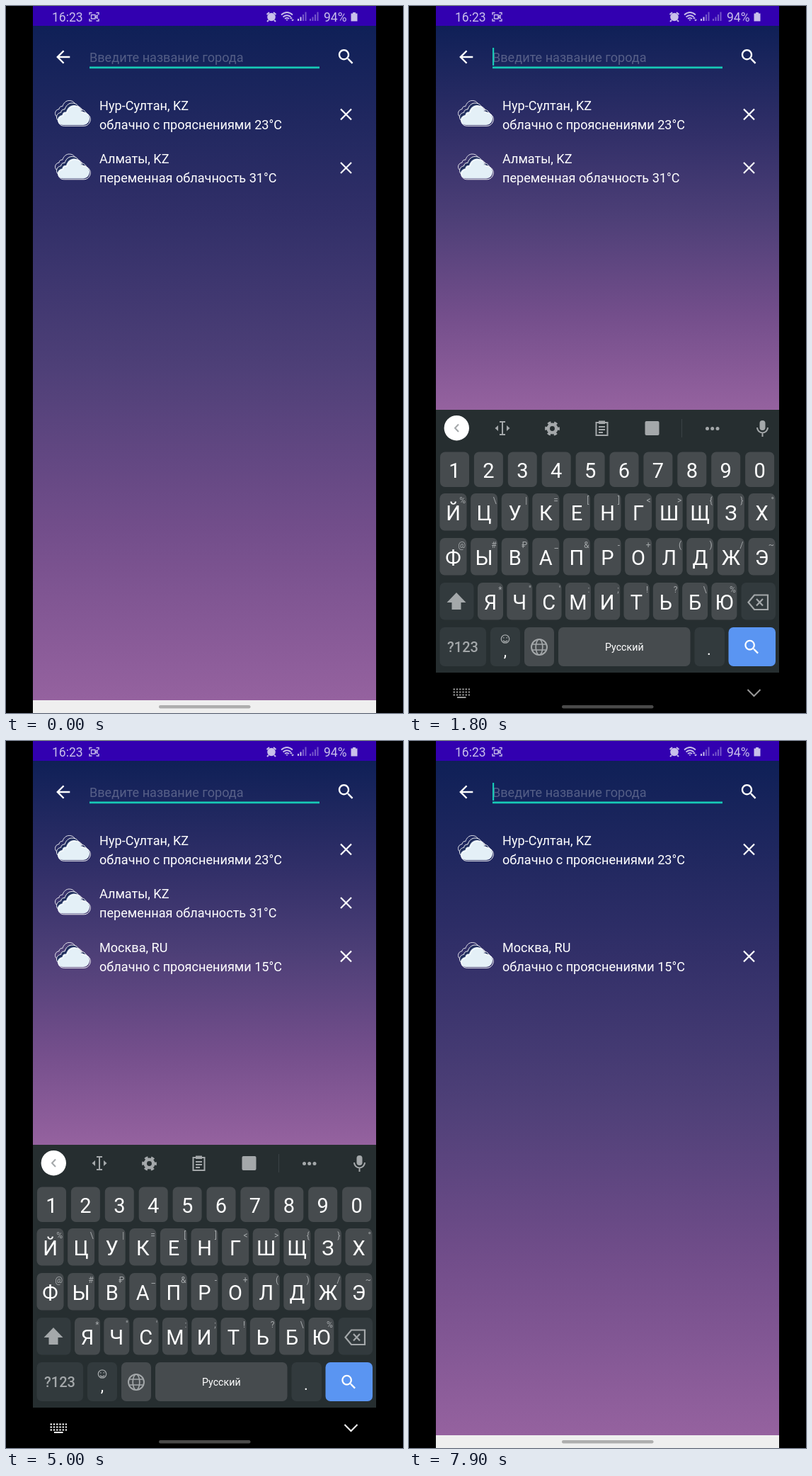
These frames come from a looping animation (561 px wide and 998 px high, 8 s). An HTML page:

```html
<!DOCTYPE html>
<html lang="ru">
<head>
<meta charset="utf-8">
<title>Города</title>
<style>
html, body { margin: 0; width: 100%; height: 100%; overflow: hidden; background: #000; }
svg { display: block; width: 561px; height: 998px; font-family: Roboto, sans-serif; }
.line { fill: none; stroke: currentColor; }
.mid { text-anchor: middle; }
.end { text-anchor: end; }
[class*="a-"] { animation: 8s linear infinite; }
.a-slide { animation-name: slide; }
.a-fade { animation-name: fade; }
.a-short { animation-name: short; animation-timing-function: step-end; }
.a-nav { animation-name: nav; }
.a-navIcons { animation-name: navIcons; }
.a-caret { animation-name: caret; animation-timing-function: step-end; }
.a-rec { animation-name: rec; animation-duration: 1s; animation-timing-function: step-end; }
.a-idle { animation-name: idle; animation-timing-function: step-end; }
.a-typing { animation-name: typing; animation-timing-function: step-end; }
.a-add { animation-name: add; }
.a-remove { animation-name: remove; }
@keyframes slide {
  0%, 9.75% { transform: translateY(113px); animation-timing-function: cubic-bezier(.33,.67,.67,1); }
  13.125% { transform: none; }
  70.125% { transform: none; animation-timing-function: cubic-bezier(.33,0,.67,.33); }
  72.31%, 100% { transform: translateY(113px); }
}
@keyframes fade {
  0%, 9% { opacity: 0; }
  11%, 70.125% { opacity: 1; }
  72.31%, 100% { opacity: 0; }
}
@keyframes short { 0%, 70% { opacity: 0; } 9.375% { opacity: 1; } }
@keyframes nav {
  0%, 12.5% { opacity: 1; }
  14%, 73.75% { opacity: 0; }
  77.5%, 100% { opacity: 1; }
}
@keyframes navIcons {
  0%, 9.7% { opacity: 0; color: #222; }
  9.8%, 12.5% { opacity: 1; color: #222; }
  22.5%, 27.4% { color: #999; }
  28.75% { color: #fff; }
  68.1% { opacity: 1; color: #fff; }
  68.2%, 100% { opacity: 0; color: #fff; }
}
@keyframes caret {
  0%, 15%, 27.5%, 58.75%, 74.375%, 86.875% { opacity: 0; }
  11.25%, 21.25%, 33.75%, 65%, 80.625%, 93.125% { opacity: 1; }
}
@keyframes rec { 0%, 75% { opacity: 1; } 22% { opacity: 0; } }
@keyframes idle { 0%, 51.25% { opacity: 1; } 33.75% { opacity: 0; } }
@keyframes typing { 0%, 51.25% { opacity: 0; } 33.75% { opacity: 1; } }
@keyframes add { 0%, 51.25% { opacity: 0; } 52.75%, 100% { opacity: 1; } }
@keyframes remove { 0%, 96% { opacity: 1; } 98%, 100% { opacity: 0; } }
</style>
</head>
<body>
<svg viewBox="0 0 561 998">
  <defs>
    <linearGradient id="sky" x2="0" y2="1">
      <stop stop-color="#0f2057"/>
      <stop offset=".28" stop-color="#312f68"/>
      <stop offset=".5" stop-color="#4d3f77"/>
      <stop offset=".75" stop-color="#734e8b"/>
      <stop offset="1" stop-color="#95629f"/>
    </linearGradient>
    <clipPath id="screen"><path d="M38 0H523V998H38Z"/></clipPath>
    <path id="cloud" d="M8 28C3 28 0 25 0 21 0 17 3 14.5 6.5 14 6.5 11 9 9 12 9.5 14 3.5 18 0 23 0 29.5 0 33 4 33.5 9 40 9 45 13 45 18.5 45 24 41 28 36 28Z"/>
    <path id="lens" d="M15.5 14h-.79l-.28-.27C15.41 12.59 16 11.11 16 9.5 16 5.91 13.09 3 9.5 3S3 5.91 3 9.5 5.91 16 9.5 16c1.61 0 3.09-.59 4.23-1.57l.27.28v.79l5 4.99L20.49 19l-4.99-5zm-6 0C7.01 14 5 11.99 5 9.5S7.01 5 9.5 5 14 7.01 14 9.5 11.99 14 9.5 14z"/>
    <g id="mic">
      <rect x="495.500" y="585" width="8" height="14" rx="4" fill="currentColor"/>
      <path class="line" d="M492 595a7.500 7.500 0 0 0 15 0M499.500 603v5" stroke-width="2"/>
    </g>
  </defs>

  <g clip-path="url(#screen)">
    <path fill="#95629f" d="M38 980H523V998H38Z"/>
    <path fill="url(#sky)" d="M38 28H523V980H38Z"/>
    <path class="a-short" fill="url(#sky)" d="M38 28H523V570H38Z"/>
    <path class="a-nav" fill="#efefef" d="M38 980H523V998H38Z"/>

    <path fill="#3200b0" d="M38 0H523V28H38Z"/>
    <g fill="#c9c0ea" color="#c9c0ea" font-size="17.500">
      <text x="65" y="21.500">16:23</text>
      <path class="line" stroke-width="1.400" d="M118 12.500V9.500H121.500M127.500 9.500H131V12.500M131 18V21H127.500M121.500 21H118V18"/>
      <path class="a-rec line" stroke-width="1.300" d="M120.500 12.500H126V18H120.500ZM126 15.200 129 13V17.500Z"/>
      <circle cx="375" cy="15.500" r="5.800"/>
      <path class="line" stroke-width="2" d="M368.500 12 372 9M381.500 12 378 9M371 20 369 22M379 20 381 22"/>
      <path class="line" stroke="#3200b0" stroke-width="1.400" d="M375 12V16H378"/>
      <path class="line" stroke-width="1.700" d="M389 12.500Q397 5.500 405 12.500M391.500 15.500Q397 11 402.500 15.500M394 18Q397 15.800 400 18"/>
      <path d="M395.500 19H398.500L397 21ZM401 18 403 15.500 405 18ZM403 19H407L405 21.500Z"/>
      <path class="line" stroke-width="2" d="M413 21V18M416.500 21V15.500"/>
      <path class="line" stroke-width="2" opacity=".45" d="M420 21V12M423.500 21V8.500M430 21V18M433.500 21V15.500M437 21V12M440.500 21V8.500"/>
      <text x="449" y="21.500">94%</text>
      <path d="M490 9H494V10.500H496.500V21.500H487.500V10.500H490Z"/>
    </g>

    <g fill="#fff">
      <path transform="translate(66.300 57.600) scale(1.200)" d="M20 11H7.830l5.590-5.590L12 4l-8 8 8 8 1.410-1.410L7.830 13H20z"/>
      <use href="#lens" transform="translate(466.300 57.500) scale(1.180)"/>
    </g>
    <g font-size="18.100" fill="#fff">
      <text class="a-idle" x="118" y="78.500" fill-opacity=".27">Введите название города</text>
      <text id="typed" x="118" y="78.500" text-decoration="underline"></text>
    </g>
    <path fill="#17c9b6" d="M118 85.500H443V88.200H118Z"/>
    <g id="caret"><path class="a-caret" fill="#17c9b6" d="M118 59H120.200V84H118Z"/></g>
    <g id="list" font-size="18.100" fill="#fff" color="#fff"></g>

    <g class="a-fade"><g class="a-slide">
      <path fill="#000" d="M38 941H523V1120H38Z"/>
      <path fill="#262e30" d="M38 570H523V941H38Z"/>
      <g id="keys"></g>
      <g fill="#fff" class="mid" font-size="29">
        <g id="digits"></g>
        <g id="upper" class="a-idle"></g>
        <g id="lower" class="a-typing"></g>
      </g>
      <g id="hints" class="end" fill="#a4a8aa" font-size="12"></g>

      <circle cx="67.300" cy="595.700" r="17.700" fill="#fff"/>
      <g color="#a4a8aa" fill="#a4a8aa">
        <use href="#mic"/>
        <g class="a-idle">
          <path class="line" stroke="#444" stroke-width="2" d="M70 590.500 65 595.700 70 601"/>
          <path class="line" stroke-width="2" d="M128 587H136M132 587V605M128 605H136"/>
          <path d="M121.500 596 126 592V600ZM142.500 596 138 592V600Z"/>
          <circle class="line" cx="202.500" cy="596.500" r="5.700" stroke-width="4.500"/>
          <circle class="line" cx="202.500" cy="596.500" r="8.700" stroke-width="3.400" stroke-dasharray="4.550 4.550" stroke-dashoffset="2.200"/>
          <path class="line" stroke-width="2" d="M264.500 588H280.500V606H264.500ZM268 594H277M268 598H277M268 602H274"/>
          <path d="M268 585.500H277V590H268Z"/>
          <rect x="333.500" y="586" width="20" height="20" rx="2"/>
          <path fill="#3b4346" d="M385 583H386V609H385Z"/>
          <circle cx="421.500" cy="596.500" r="2.500"/><circle cx="428.700" cy="596.500" r="2.500"/><circle cx="436" cy="596.500" r="2.500"/>
        </g>
        <g class="a-typing">
          <path class="line" stroke="#444" stroke-width="2" d="M65 590.500 70 595.700 65 601"/>
          <text id="suggest" class="mid" x="279" y="604.500" font-size="21.300"></text>
        </g>
        <path class="a-idle" d="M67 828 80.500 842H73.500V852H60.500V842H53.500Z"/>
        <path class="a-typing line" stroke-width="2" d="M67 829.500 78.500 841.500H72.500V852H61.500V841.500H55.500Z"/>
        <path class="line" stroke-width="2.200" d="M488 831.500H507V852H488L479.500 841.700ZM491 837 500 846.500M500 837 491 846.500"/>
        <g class="mid">
          <text x="76" y="912" font-size="20" font-weight="500">?123</text>
          <text x="304.300" y="910" font-size="14.200" fill="#fff">Русский</text>
          <text x="136" y="918" font-size="22" fill="#fff">,</text>
          <text x="424" y="916" font-size="22" fill="#fff">.</text>
        </g>
        <circle class="line" cx="136" cy="893.500" r="5.700" stroke-width="1.300"/>
        <path class="line" stroke-width="1.300" d="M133 895.500Q136 899 139 895.500M133.800 891V892.500M138.200 891V892.500"/>
        <circle class="line" cx="184" cy="905" r="11" stroke-width="1.900"/>
        <ellipse class="line" cx="184" cy="905" rx="4.800" ry="11" stroke-width="1.700"/>
        <path class="line" stroke-width="1.700" d="M174 901H194M174 909H194"/>
        <use href="#lens" fill="#fff" transform="translate(471 891.500) scale(1.120)"/>
      </g>
    </g></g>

    <g class="a-navIcons">
      <path class="line" stroke-width="2" stroke-dasharray="2.500 1.750" d="M62.500 964.500H86M62.500 968.500H86M62.500 972.500H86"/>
      <path class="line" stroke-width="2" d="M68 976H80.500M478.500 965 487.500 974 496.500 965"/>
    </g>
    <rect x="216" y="987" width="129.500" height="4.400" rx="2.200" fill="#808080" fill-opacity=".58"/>
  </g>
</svg>
<script>
const $ = id => document.getElementById(id);
const put = (id, markup) => $(id).insertAdjacentHTML('beforeend', markup);

const cities = [
  ['Нур-Султан, KZ', 'облачно с прояснениями 23°C', ''],
  ['Алматы, KZ', 'переменная облачность 31°C', 'a-remove'],
  ['Москва, RU', 'облачно с прояснениями 15°C', 'a-add']
];
cities.forEach(([city, weather, anim], i) => put('list', `
  <g class="${anim}" transform="translate(0 ${i * 75.5})">
    <g class="line" stroke="#4aa3dc">
      <use href="#cloud" transform="translate(69.500 133.500) scale(.86)"/>
      <use href="#cloud" transform="translate(71.500 137) scale(.95)" fill="#22305f"/>
    </g>
    <use href="#cloud" transform="translate(73 140)" fill="#e4f0f7"/>
    <use href="#cloud" class="line" transform="translate(74.200 141.300)" stroke="#4aa3dc"/>
    <text x="132" y="146.500">${city}</text>
    <text x="132" y="173.500">${weather}</text>
    <path class="line" stroke-width="2.200" d="M473 145.500 488 160.500M488 145.500 473 160.500"/>
  </g>`));

const key = (x, y, w, h, fill = '#464b4e') =>
  put('keys', `<rect x="${x}" y="${y}" width="${w}" height="${h}" rx="7" fill="${fill}"/>`);
const label = (id, x, y, s) => put(id, `<text x="${x}" y="${y}">${s}</text>`);
const escapeHtml = c => c.replace('&', '&amp;').replace('<', '&lt;');

[...'1234567890'].forEach((d, i) => {
  key(44 + i * 47.9, 629.5, 41, 49.5);
  label('digits', 64.5 + i * 47.9, 665.5, d);
});

const rows = [
  ['йцукенгшщзх', '%\\|=[]<>{}°', 43.5, 43.6, 38, 688],
  ['фывапролджэ', '@#₽_&-+()/~', 43.5, 43.6, 38, 751],
  ['ячсмитьбю', '*"\':;!?\\%', 97, 41.3, 36, 814]
];
for (const [letters, marks, x0, step, w, y] of rows) {
  [...letters].forEach((c, i) => {
    const x = x0 + i * step;
    key(x, y, w, 52.5);
    label('upper', x + w / 2, y + 37.5, c.toUpperCase());
    label('lower', x + w / 2, y + 35.5, c);
    label('hints', x + w - 1.5, y + 13.5, escapeHtml(marks[i]));
  });
}

const dark = '#323a3d';
key(43.5, 814, 48, 52.5, dark);
key(469.5, 814, 48.5, 52.5, dark);
key(43.5, 877, 65.5, 55, dark);
key(115, 877, 42, 55, dark);
key(163, 877, 42, 55);
key(211, 877, 186.5, 55);
key(403.5, 877, 42.5, 55, dark);
key(451.5, 877, 66.5, 55, '#5a95f2');

const word = 'Москва', typeStart = 2700, typeStep = 110, cleared = 4100;
let start, shown;
function tick(now) {
  start ??= now;
  const t = (now - start) % 8000;
  const count = t < typeStart || t >= cleared ? 0
    : Math.min(word.length, 1 + Math.floor((t - typeStart) / typeStep));
  if (count !== shown) {
    shown = count;
    const text = word.slice(0, count);
    $('typed').textContent = $('suggest').textContent = text;
    const x = count ? $('typed').getComputedTextLength() + 1 : 0;
    $('caret').setAttribute('transform', `translate(${x} 0)`);
  }
  requestAnimationFrame(tick);
}
requestAnimationFrame(tick);
</script>
</body>
</html>
```
